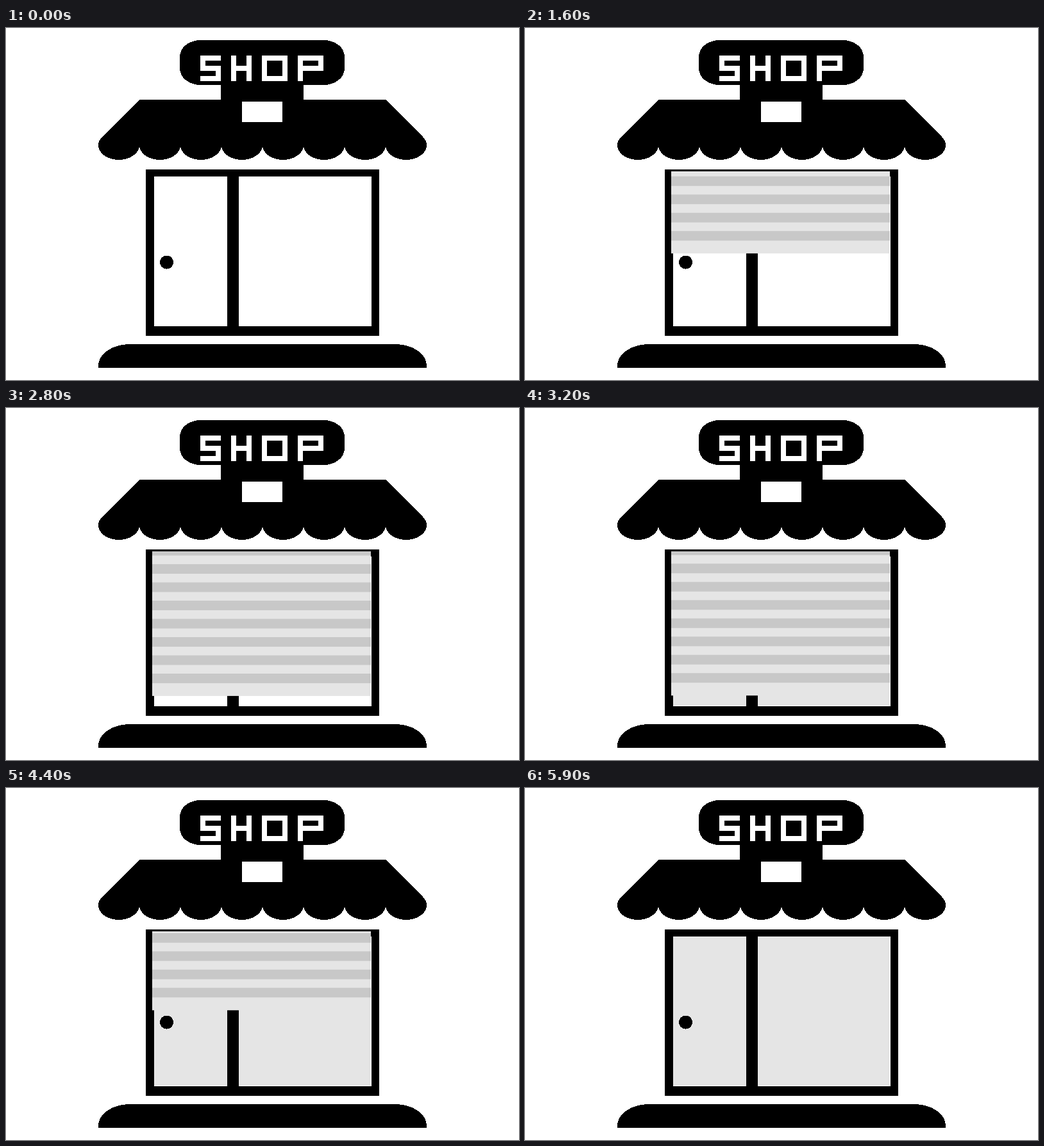
Animation, 800 px wide and 550 px high, one loop 6 s. Source, as an HTML page:

```html
<!DOCTYPE html>
<html lang="en">
<head>
<meta charset="utf-8">
<title>Shop shutter</title>
<style>
  html, body { margin: 0; width: 100%; height: 100%; overflow: hidden; background: #fff; }
  svg { display: block; width: 800px; height: 550px; }
</style>
</head>
<body>
<svg viewBox="0 0 800 550">
  <clipPath id="opening"><rect x="228" y="224" width="341" height="241"/></clipPath>

  <g shape-rendering="crispEdges">
    <!-- sign -->
    <rect x="271" y="19" width="257" height="70" rx="32" ry="26"/>
    <rect x="335" y="85" width="129" height="30"/>
    <g fill="none" stroke="#fff" stroke-width="8">
      <path d="M335 47H307V63H331V79H303"/>
      <path d="M355 43V83M379 43V83M355 63H379"/>
      <path d="M403 47H435V79H403Z"/>
      <path d="M459 83V47H491V63H459"/>
    </g>

    <!-- awning -->
    <path id="awning"/>
    <rect x="208" y="183" width="384" height="4"/>
    <rect x="368" y="115" width="63" height="32" fill="#fff"/>

    <!-- front -->
    <rect x="218" y="221" width="364" height="260"/>
    <path fill="#fff" d="M231 232H345V466H231ZM363 232H570V466H363Z"/>
    <path id="tint" fill="#e5e5e5" d="M231 232H345V465H231ZM363 232H569V465H363Z"/>
    <circle cx="250.5" cy="366" r="10.5"/>

    <!-- step -->
    <path d="M144 531V528A49 34 0 0 1 193 494H607A49 34 0 0 1 656 528V531Z"/>
  </g>

  <g clip-path="url(#opening)">
    <g id="shutter">
      <rect x="228" y="-260" width="341" height="260" fill="#e5e5e5"/>
      <path id="slats" fill="#c8c8c8"/>
    </g>
  </g>
</svg>
<script>
  const LOOP = 6000, STEP = 100, TURN = 30;
  const get = id => document.getElementById(id);
  const repeat = (count, make) => Array.from({ length: count }, (_, i) => make(i)).join('');

  get('awning').setAttribute('d',
    'M208 112H592L650 170Q656 176 656 183' +
    repeat(8, () => 'a32 23 0 0 1 -64 0') +
    'Q144 176 150 170Z');
  get('slats').setAttribute('d', repeat(9, i => `M228 ${-35 - 28.5 * i}h341v15h-341z`));

  function draw(now) {
    const step = Math.floor((now % LOOP) / STEP);
    const rising = step >= TURN;
    const bottom = rising ? 466.3 - 8.5 * (step - TURN) : 222 + 8.14 * step;
    get('shutter').setAttribute('transform', `translate(0 ${bottom})`);
    get('tint').setAttribute('visibility', rising ? 'visible' : 'hidden');
  }

  const start = performance.now();
  function tick() {
    draw(performance.now() - start);
    requestAnimationFrame(tick);
  }
  tick();
</script>
</body>
</html>
```
